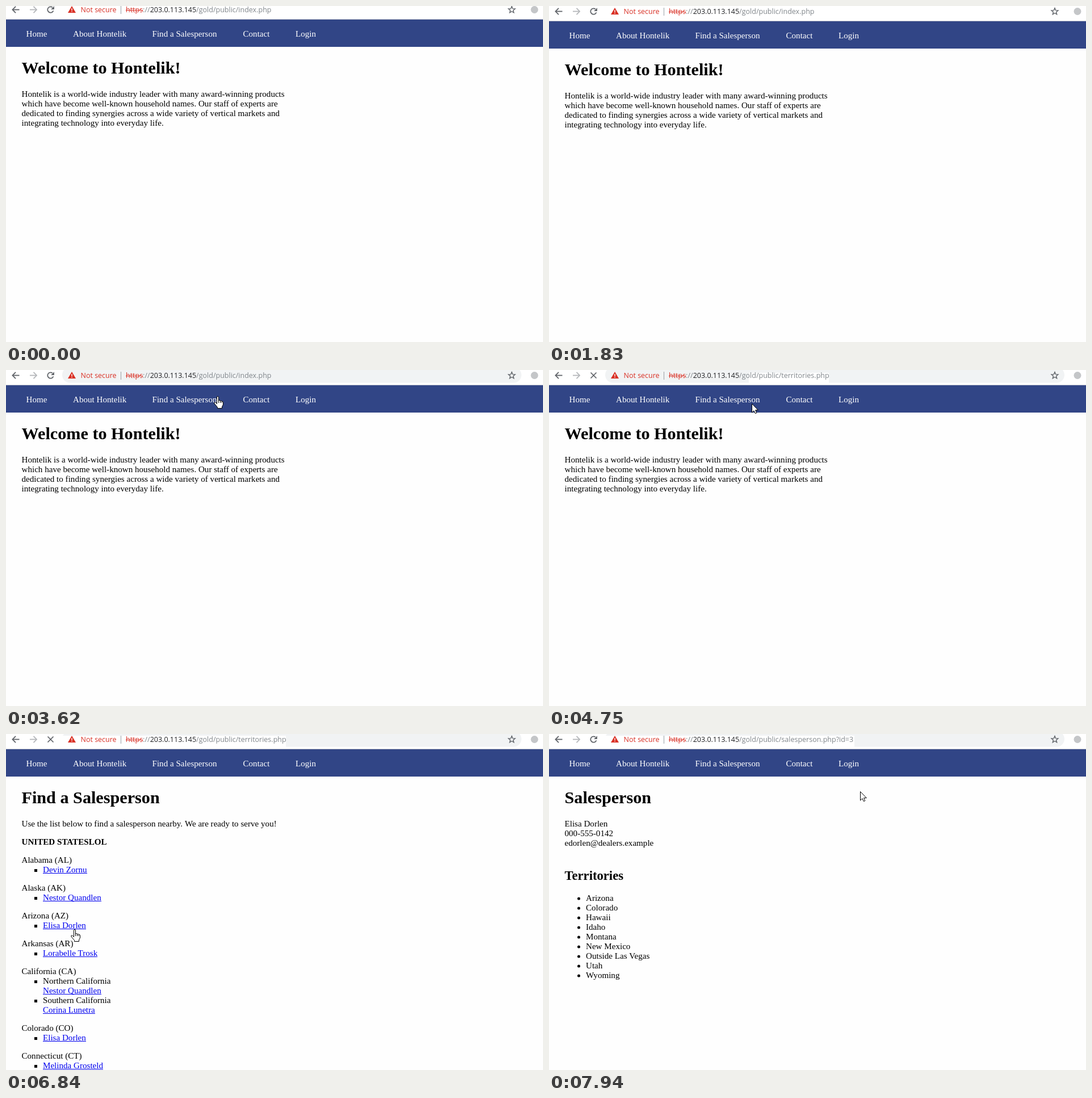
An HTML page with a canvas that plays this animation: 946x592 px, repeating every 8000 ms.

```html
<!DOCTYPE html>
<html lang="en">
<head>
<meta charset="utf-8">
<title>Find a Salesperson</title>
<style>
html, body { margin: 0; width: 100%; height: 100%; overflow: hidden; background: #fff; }
canvas { display: block; }
</style>
</head>
<body>
<canvas id="stage" width="946" height="592"></canvas>
<script>
const ctx = document.getElementById('stage').getContext('2d');
const LOOP = 8000;
const SERIF = '"Liberation Serif", "Times New Roman", serif';
const BODY = '15.1px ' + SERIF;
const BOLD = 'bold 15.1px ' + SERIF;
const H1 = 'bold 30.2px ' + SERIF;
const H2 = 'bold 22.65px ' + SERIF;
const UI = '12.5px "Open Sans", "Noto Sans", sans-serif';
const LEFT = 27.5, INDENT = 65;
const RED = '#d93025', GREY = '#80868b', DARK = '#5f6368';

// Pointer stops: start time, shape, left, top
const stops = [
  [2120, 'beam', 430, -14], [2260, 'beam', 454, 6], [2410, 'arrow', 274, 33],
  [2560, 'arrow', 522, 68], [2690, 'arrow', 421, 86], [2830, 'arrow', 459, 73],
  [2980, 'hand', 451, 44], [3380, 'hand', 432, 46], [3500, 'hand', 395, 47],
  [3620, 'hand', 366, 46], [3740, 'hand', 355, 50], [3890, 'hand', 352, 52],
  [4600, 'arrow', 357, 63], [4750, 'arrow', 357, 59], [5170, 'arrow', 282, 76],
  [5320, 'beam', 214, 102], [5450, 'arrow', 152, 160], [5590, 'arrow', 146, 205],
  [5710, 'arrow', 131, 265], [5840, 'arrow', 120, 315], [5960, 'hand', 114, 341],
  [6110, 'hand', 114, 344], [7280, 'arrow', 119, 344], [7420, 'arrow', 150, 341],
  [7540, 'arrow', 290, 322], [7660, 'arrow', 419, 287], [7810, 'arrow', 500, 180],
  [7940, 'arrow', 548, 101]
];

const states = [
  ['Alabama (AL)', 'Devin Zornu'],
  ['Alaska (AK)', 'Nestor Quandlen'],
  ['Arizona (AZ)', 'Elisa Dorlen'],
  ['Arkansas (AR)', 'Lorabelle Trosk'],
  ['California (CA)', ['Northern California', 'Nestor Quandlen'], ['Southern California', 'Corina Lunetra']],
  ['Colorado (CO)', 'Elisa Dorlen'],
  ['Connecticut (CT)', 'Melinda Grosteld']
];

const arrowPath = new Path2D('M.5 .5V16L4 12.7L6.4 17.7L8.8 16.7L6.6 11.7H11.3Z');
const handPath = new Path2D('M5.5 13.5V2Q5.5 .5 7 .5Q8.5 .5 8.5 2V8Q10 6.3 11.5 8.5Q13 7.2 14 9.3Q16.5 8.8 16.5 11V15L14.5 19V21.5H6.5V19.5L1 13Q.3 11 2 10.8Q3.5 11 5.5 13.5Z');
const knuckles = new Path2D('M8.5 8V12M11.5 8.5V12M14 9.5V12');
const beamPath = new Path2D('M.5 .5H3.5M5.5 .5H8.5M4.5 1V16M.5 16.5H3.5M5.5 16.5H8.5');

function text(str, x, y, font = BODY, color = '#000') {
  ctx.font = font;
  ctx.fillStyle = color;
  ctx.fillText(str, x, y);
  return ctx.measureText(str).width;
}

function rect(x, y, w, h, color) {
  ctx.fillStyle = color;
  ctx.fillRect(x, y, w, h);
}

function line(color, width, ...pts) {
  ctx.strokeStyle = color;
  ctx.lineWidth = width;
  ctx.beginPath();
  pts.forEach(([x, y]) => ctx.lineTo(x, y));
  ctx.stroke();
}

function lines(list, y) {
  list.forEach((s, i) => text(s, LEFT, y + i * 17));
}

function link(str, y) {
  const w = text(str, INDENT, y, BODY, '#0000ee');
  rect(INDENT, y + 1, Math.round(w), 1, '#0000ee');
}

function square(y) {
  rect(50, y - 6, 5, 5, '#000');
}

function arrowIcon(x, dir, color) {
  line(color, 1.8, [x - 6 * dir, 6.5], [x + 6 * dir, 6.5]);
  line(color, 1.8, [x + .5 * dir, .8], [x + 6 * dir, 6.5], [x + .5 * dir, 12.2]);
}

function reloadIcon(x, y) {
  ctx.strokeStyle = DARK;
  ctx.lineWidth = 1.8;
  ctx.beginPath();
  ctx.arc(x, y, 5.2, .35, Math.PI * 1.72);
  ctx.stroke();
  ctx.fillStyle = DARK;
  ctx.beginPath();
  ctx.moveTo(x + 6.4, y - 6.2);
  ctx.lineTo(x + 6.4, y - .4);
  ctx.lineTo(x + .6, y - .4);
  ctx.fill();
}

function stopIcon(x, y) {
  line(DARK, 1.7, [x - 5, y - 5], [x + 5, y + 5]);
  line(DARK, 1.7, [x + 5, y - 5], [x - 5, y + 5]);
}

function star(x, y) {
  ctx.strokeStyle = DARK;
  ctx.lineWidth = 1.4;
  ctx.beginPath();
  for (let i = 0; i < 10; i++) {
    const a = i * Math.PI / 5 - Math.PI / 2, r = i % 2 ? 2.7 : 6.2;
    ctx.lineTo(x + r * Math.cos(a), y + r * Math.sin(a));
  }
  ctx.closePath();
  ctx.stroke();
}

function toolbar(t) {
  rect(0, -3, 946, 26, '#fff');
  if (t >= 2260) {
    ctx.fillStyle = '#f1f3f4';
    ctx.beginPath();
    ctx.roundRect(99, -8, 809, 27.5, 13.7);
    ctx.fill();
    if (t >= 4900) rect(26, 0, (t < 7280 ? 493 : 538) - 26, 20, '#fff');
    else if (t >= 4750) rect(352, 2, 141, 18, '#fff');
  }
  arrowIcon(17.5, -1, DARK);
  arrowIcon(48, 1, '#b4b6b9');
  const loading = (t >= 4040 && t < 4900) || (t >= 6840 && t < 7280);
  (loading ? stopIcon : reloadIcon)(78.5, 6.5);

  ctx.fillStyle = RED;
  ctx.beginPath();
  ctx.moveTo(116, 0);
  ctx.lineTo(123, 12);
  ctx.lineTo(109, 12);
  ctx.fill();
  rect(115.3, 4, 1.4, 4, '#fff');
  rect(115.3, 9, 1.4, 1.4, '#fff');
  text('Not secure', 131.5, 11, UI, RED);
  rect(202, 0, 1, 14, '#9aa0a6');

  const page = t < 4750 ? 'index.php' : t < 7280 ? 'territories.php' : 'salesperson.php?id=3';
  let x = 211;
  const scheme = text('https', x, 11, UI, RED);
  rect(x, 7, scheme, 1, RED);
  x += scheme;
  x += text('://', x, 11, UI, GREY);
  x += text('203.0.113.145', x, 11, UI, '#202124');
  text('/gold/public/' + page, x, 11, UI, GREY);

  star(891, 6.8);
  ctx.fillStyle = '#c4c6c8';
  ctx.beginPath();
  ctx.arc(931, 6.5, 6.5, 0, Math.PI * 2);
  ctx.fill();
}

function nav() {
  rect(0, 23, 946, 1, '#b8bcc8');
  rect(0, 24, 946, 48, '#314586');
  const items = [['Home', 35.5], ['About Hontelik', 118], ['Find a Salesperson', 257.5], ['Contact', 417.5], ['Login', 510]];
  items.forEach(([s, x]) => text(s, x, 54, BODY, '#fff'));
}

function homePage() {
  text('Welcome to Hontelik!', LEFT, 119, H1);
  lines([
    'Hontelik is a world-wide industry leader with many award-winning products',
    'which have become well-known household names. Our staff of experts are',
    'dedicated to finding synergies across a wide variety of vertical markets and',
    'integrating technology into everyday life.'
  ], 160);
}

function listPage() {
  text('Find a Salesperson', LEFT, 119, H1);
  text('Use the list below to find a salesperson nearby. We are ready to serve you!', LEFT, 160);
  text('UNITED STATESLOL', LEFT, 192, BOLD);
  let y = 224;
  for (const [state, ...entries] of states) {
    text(state, LEFT, y);
    for (const entry of entries) {
      y += 17;
      square(y);
      if (Array.isArray(entry)) {
        text(entry[0], INDENT, y);
        y += 17;
        link(entry[1], y);
      } else {
        link(entry, y);
      }
    }
    y += 32;
  }
}

function personPage() {
  text('Salesperson', LEFT, 119, H1);
  lines(['Elisa Dorlen', '000-555-0142', 'edorlen@dealers.example'], 160);
  text('Territories', LEFT, 254, H2);
  const places = ['Arizona', 'Colorado', 'Hawaii', 'Idaho', 'Montana', 'New Mexico', 'Outside Las Vegas', 'Utah', 'Wyoming'];
  places.forEach((s, i) => {
    const y = 291 + i * 17;
    text(s, INDENT, y);
    ctx.beginPath();
    ctx.arc(52.5, y - 4, 2.5, 0, Math.PI * 2);
    ctx.fill();
  });
}

function pointer(t) {
  const stop = stops.filter(s => s[0] <= t).pop();
  if (!stop) return;
  const [, shape, x, y] = stop;
  ctx.save();
  ctx.translate(x, y);
  ctx.lineWidth = 1;
  ctx.strokeStyle = '#000';
  ctx.fillStyle = '#fff';
  if (shape === 'beam') {
    ctx.stroke(beamPath);
  } else {
    const path = shape === 'hand' ? handPath : arrowPath;
    ctx.fill(path);
    ctx.stroke(path);
    if (shape === 'hand') ctx.stroke(knuckles);
  }
  ctx.restore();
}

function draw(t) {
  const shift = t < 1290 ? 0 : t < 1550 ? 1 : t < 1830 ? 2 : 3;
  rect(0, 0, 946, 592, '#fefefe');
  ctx.save();
  ctx.translate(0, shift);
  toolbar(t);
  nav();
  (t < 4900 ? homePage : t < 7280 ? listPage : personPage)();
  ctx.restore();
  pointer(t);
}

const start = performance.now();
function tick(now) {
  draw(Math.max(0, now - start) % LOOP);
  requestAnimationFrame(tick);
}
draw(0);
requestAnimationFrame(tick);
</script>
</body>
</html>
```
